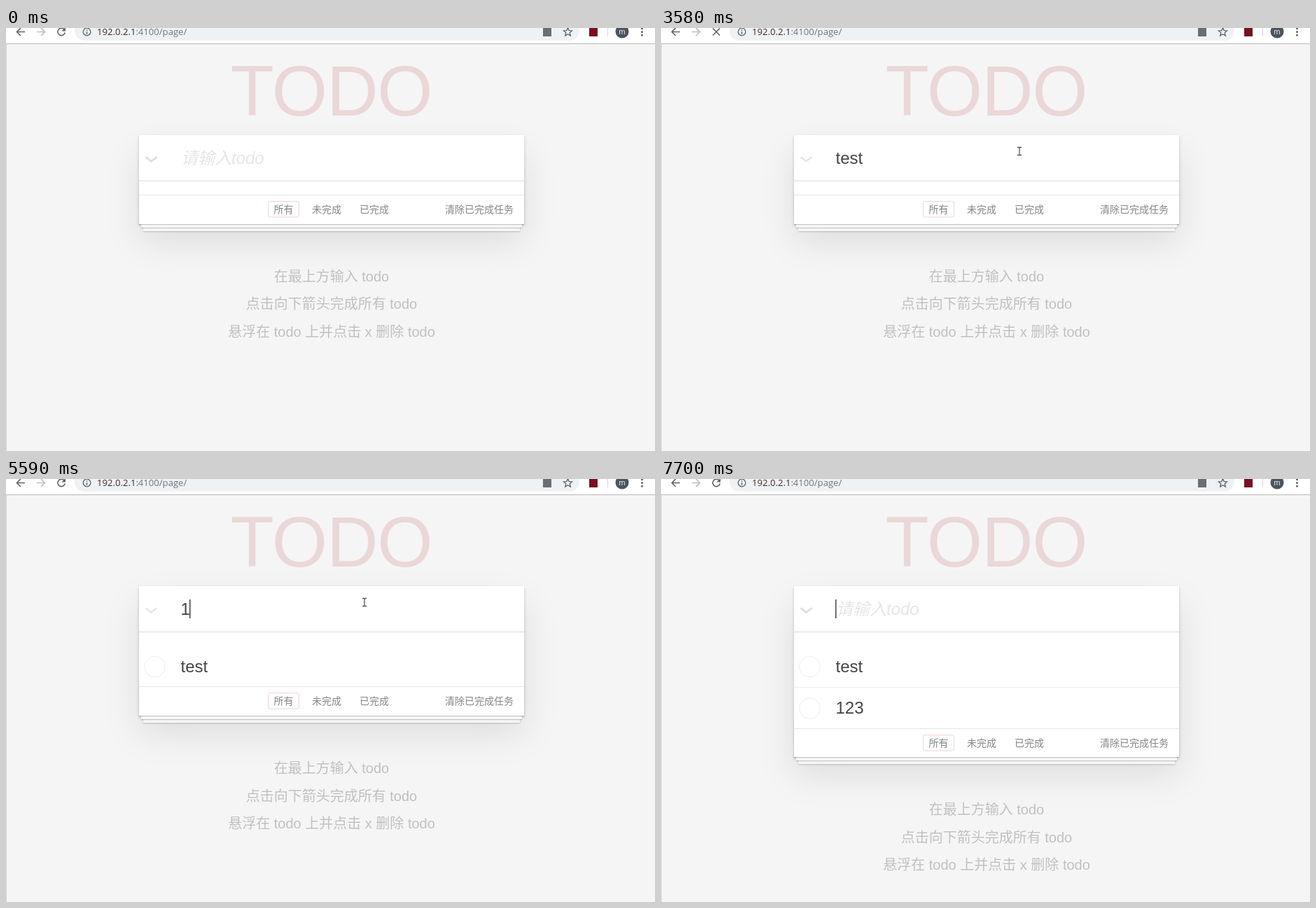
Animation of 927x604 px, one loop 8.25 s. Source, as an HTML page:

```html
<!DOCTYPE html>
<html lang="zh-CN">
<head>
<meta charset="utf-8">
<title>Todo</title>
<style>
  html, body { margin: 0; width: 100%; height: 100%; overflow: hidden; background: #f5f5f5; }
  #card, #stack, svg { position: absolute; }
  #card {
    left: 190px; top: 153px; width: 550px; background: #fff;
    box-shadow: 0 2px 4px rgba(0,0,0,.2), 0 25px 50px rgba(0,0,0,.1);
  }
  #stack {
    left: 0; right: 0; bottom: 0; height: 50px;
    box-shadow: 0 1px 1px rgba(0,0,0,.2), 0 8px 0 -3px #f6f6f6, 0 9px 1px -3px rgba(0,0,0,.2),
      0 16px 0 -6px #f6f6f6, 0 17px 2px -6px rgba(0,0,0,.2);
  }
  svg { left: 0; top: 0; width: 927px; height: 604px; }
  text { font: 300 24px 'Liberation Sans', 'Noto Sans CJK SC', 'Noto Sans CJK', sans-serif; fill: #454545; white-space: pre; }
  #title { font-size: 102px; letter-spacing: -1.2px; fill: rgba(175,47,47,.15); }
  #placeholder { font-style: italic; fill: #e6e6e6; }
  #filters text { font-size: 14px; fill: #858585; }
  #hints text { font-size: 20px; fill: #bfbfbf; text-anchor: middle; text-shadow: 0 1px 0 rgba(255,255,255,.5); }
  #url { font: 13.1px 'Open Sans', sans-serif; fill: #70757a; }
  #url tspan { fill: #402a2a; }
  #avatar { font: 10px 'Open Sans', sans-serif; fill: #fff; text-anchor: middle; }
  .icon { fill: none; stroke: #5f6368; stroke-width: 1.6; }
  .rule { stroke: #e6e6e6; }
  .toggle { fill: #fff; stroke: #ededed; }
</style>
</head>
<body>
<div id="card"><div id="stack"></div></div>
<svg viewBox="0 0 927 604">
  <!-- browser bar -->
  <path fill="#fff" d="M0 0H927V22H0Z"/>
  <path stroke="#b9b9b9" d="M0 22.5H927"/>
  <path stroke="#d4d4d4" d="M.5 23V604"/>
  <rect x="98" y="-10" width="721" height="28" rx="14" fill="#eff2f4"/>
  <path class="icon" d="M27 5.5H15.5M21 0L15.5 5.5 21 11"/>
  <path class="icon" d="M44 5.5H55.5M50 0L55.5 5.5 50 11" style="stroke:#bcbec1"/>
  <g id="reload">
    <path class="icon" d="M83 2A5.2 5.2 0 1 0 84.2 6.5"/>
    <path fill="#5f6368" d="M85 -1V4.6H79.4Z"/>
  </g>
  <path id="stop" class="icon" d="M74 .5L84 10.5M84 .5L74 10.5"/>
  <circle class="icon" cx="115.5" cy="5.5" r="5.3" style="stroke-width:1.3"/>
  <path class="icon" d="M115.5 5V8.8M115.5 2.3V3.7" style="stroke-width:1.4"/>
  <text id="url" x="130" y="10"><tspan>192.0.2.1</tspan>:4100/page/</text>
  <rect id="tool" x="767" y="0" width="12" height="12" fill="#6b6f74"/>
  <path class="icon" style="stroke-width:1.3" d="M802.5 -.5L804.2 3.6 808.5 3.9 805.2 6.7 806.3 11 802.5 8.7 798.7 11 799.8 6.7 796.5 3.9 800.8 3.6Z"/>
  <rect x="833" y="0" width="12" height="12" fill="#78101f"/>
  <path stroke="#d5d7da" d="M859.5 0V12"/>
  <circle cx="880" cy="5" r="9.5" fill="#4b5560"/>
  <text id="avatar" x="880" y="8.5">m</text>
  <g fill="#5f6368"><circle cx="908.5" cy=".8" r="1.5"/><circle cx="908.5" cy="5.5" r="1.5"/><circle cx="908.5" cy="10.2" r="1.5"/></g>

  <!-- page -->
  <text id="title" x="320.5" y="124.5">TODO</text>
  <path fill="rgba(0,0,0,.03)" d="M190 216.5H740V218H190Z"/>
  <path class="rule" d="M190 218.5H740" style="stroke:#e0e0e0"/>
  <path id="chevron" fill="none" d="M199.5 184.3L207.5 190.3 215.5 184.3"/>
  <text id="placeholder" x="250" y="194">请输入todo</text>
  <text id="typed" x="249.5" y="194"></text>
  <rect id="caret" y="172" width="1.5" height="27" fill="#444"/>

  <g id="first">
    <circle class="toggle" cx="212.5" cy="268" r="14.8"/>
    <text x="249.5" y="276.3">test</text>
  </g>
  <g id="second">
    <path class="rule" d="M190 297.5H740" style="stroke:#ededed"/>
    <circle class="toggle" cx="212.5" cy="327.5" r="14.8"/>
    <text x="249.5" y="335.3">123</text>
  </g>

  <g id="lines">
    <path class="rule" d="M190 238.5H740"/>
    <rect x="374.5" y="247.5" width="44" height="22.5" rx="3" fill="none" stroke="rgba(175,47,47,.2)"/>
  </g>
  <g id="labels">
    <g id="filters">
      <text x="382.5" y="264">所有</text>
      <text x="437" y="264">未完成</text>
      <text x="505" y="264">已完成</text>
      <text x="627" y="264">清除已完成任务</text>
    </g>
    <g id="hints">
      <text x="465" y="361.5">在最上方输入 todo</text>
      <text x="465" y="401.2">点击向下箭头完成所有 todo</text>
      <text x="465" y="440.9">悬浮在 todo 上并点击 x 删除 todo</text>
    </g>
  </g>

  <circle id="click" cx="510" cy="175" r="11" fill="rgba(255,255,0,.47)"/>
  <path id="beam" fill="none" stroke="#555" stroke-width="1.3" d="M-3 -5.5H3M0 -5.5V5.5M-3 5.5H3"/>
  <path id="arrow" fill="#fff" stroke="#222" d="M.5 .5V16.5L4 13.2 6.4 18.7 8.6 17.7 6.3 12.4H11.5Z"/>
</svg>
<script>
  const LOOP = 8250;
  const $ = id => document.getElementById(id);
  const show = (id, on) => { $(id).style.display = on ? '' : 'none'; };
  const move = (id, x, y) => $(id).setAttribute('transform', `translate(${x} ${y})`);

  // Each entry holds from its time until the next one.
  const at = (steps, t) => steps.findLast(([start]) => start <= t)[1];
  const within = (t, from, to) => t >= from && t < to;

  const typing = [[0, ''], [2030, 't'], [2260, 'te'], [2560, 'tes'], [2810, 'test'], [3660, ''],
    [5590, '1'], [5760, '12'], [5990, '123'], [6690, '']];
  const blinks = [0, 930, 1480, 2030, 3340, 3660, 4120, 4670, 5210, 5590, 6520, 6690, 7150, 7700]
    .map((start, i) => [start, i % 2 === 1]);
  const itemCount = [[0, 0], [3660, 1], [6690, 2]];
  const pointer = [[0, null], [470, ['arrow', 801, 503]], [550, ['arrow', 722, 405]],
    [630, ['arrow', 612, 280]], [700, ['beam', 534, 196]], [780, ['beam', 512, 176]],
    [7530, ['arrow', 690, 380]], [7610, ['arrow', 899, 588]], [7700, null]];

  function draw(t) {
    const text = at(typing, t), count = at(itemCount, t), mouse = at(pointer, t);
    const shift = [0, 58.4, 117.6][count];

    $('typed').textContent = text;
    show('placeholder', !text);
    show('caret', at(blinks, t));
    $('caret').setAttribute('x', Math.floor(249 + (text ? $('typed').getComputedTextLength() : 0)));
    $('chevron').setAttribute('stroke', text ? '#e6e6e6' : '#e0e0e0');
    $('chevron').setAttribute('stroke-width', text ? 2.5 : 3);

    show('first', count > 0);
    show('second', count > 1);
    $('card').style.height = 126.6 + shift + 'px';
    move('lines', 0, Math.round(shift));
    move('labels', 0, shift);

    const loading = within(t, 3510, 3660) || within(t, 6610, 6690);
    show('reload', !loading);
    show('stop', loading);
    show('tool', !within(t, 6610, 6690));

    show('click', within(t, 930, 1080));
    for (const kind of ['beam', 'arrow']) show(kind, mouse && mouse[0] === kind);
    if (mouse) move(...mouse);
  }

  const begin = performance.now();
  function tick() {
    draw((performance.now() - begin) % LOOP);
    requestAnimationFrame(tick);
  }
  tick();
</script>
</body>
</html>
```
